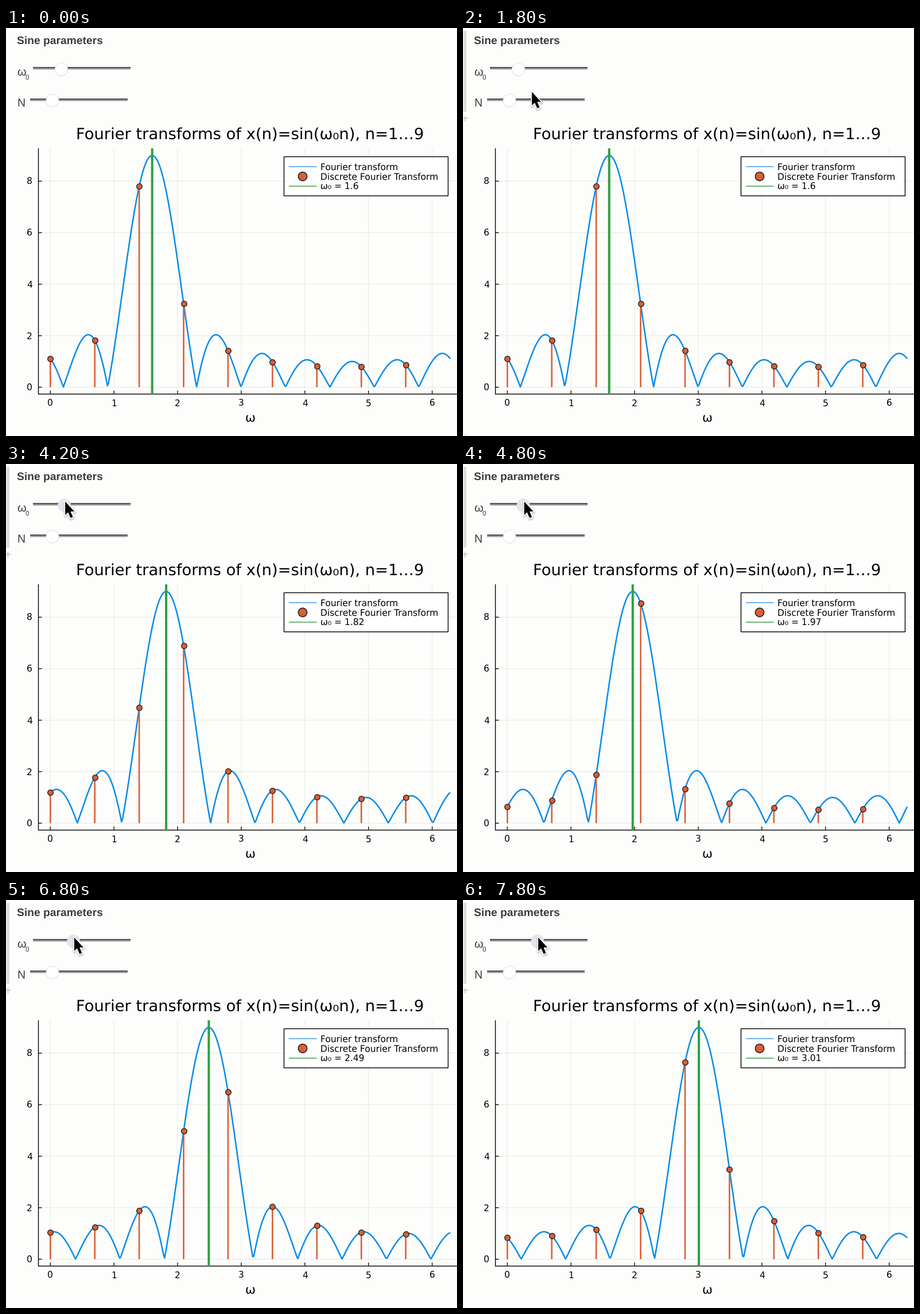
Animation, 786 px wide and 712 px high, one loop 8000 ms. Source, as a matplotlib script:

```python
import numpy as np
import matplotlib.pyplot as plt
from matplotlib.animation import FuncAnimation
from matplotlib.patches import Circle, Polygon, Rectangle

W, H, DPI = 786, 712, 64          # a power of two keeps the pixel size exact
PT = 72 / DPI                     # points per pixel
STEP, FRAMES = 200, 40
N = 9

BG, INK = "#fdfdfc", "#3b3b3b"
BLUE, ORANGE, GREEN = "#078be8", "#d95f35", "#2f9f43"

X0, XU = 77.3, 110.9              # plot origin and pixels per unit
Y0, YU = 626.8, 44.93
LEFT, TOP, BOTTOM = 56.5, 210, 638.8

plt.rcParams["text.hinting"] = "no_hinting"
fig = plt.figure(figsize=(W / DPI, H / DPI), dpi=DPI, facecolor=BG)
ax = fig.add_axes([0, 0, 1, 1])
ax.axis("off")


def px(w):
    return X0 + XU * np.asarray(w)


def py(v):
    return Y0 - YU * np.asarray(v)


def line(xs, ys, color="black", width=1.4, z=2, **kw):
    kw.setdefault("solid_capstyle", "butt")
    return ax.plot(xs, ys, color=color, lw=width * PT, zorder=z, snap=False, **kw)[0]


def shape(patch):
    patch.set_snap(False)
    return ax.add_patch(patch)


def label(x, y, s, size, ha="left", color="black", font="DejaVu Sans", **kw):
    return ax.text(x, y, s, fontsize=size * PT, ha=ha, va="baseline",
                   color=color, family=font, zorder=9, **kw)


def spectrum(w, w0):
    """Magnitude of the transform of N samples of a complex tone."""
    half = (np.asarray(w) - w0) / 2
    s = np.sin(half)
    flat = np.abs(s) < 1e-9
    return np.where(flat, N, np.abs(np.sin(N * half) / np.where(flat, 1, s)))


def slider(x, y, knob_x):
    """Draw a track; return the knob with its soft halos."""
    shades = np.array([[75], [95], [135], [165], [205]])
    ax.imshow(np.repeat(shades[:, :, None], 3, axis=2).astype(np.uint8),
              extent=(x, x + 170, y + 5, y), interpolation="nearest",
              aspect="auto", zorder=2)
    halos = [shape(Circle((knob_x, y + 3.8), r, fc="#555577", ec="none",
                          alpha=a, zorder=3)) for r, a in ((12.2, .05), (11.6, .08))]
    knob = shape(Circle((knob_x, y + 3.5), 11, fc="white", ec="#e6e4ec",
                        lw=.8 * PT, zorder=4))
    return knob, halos


# Controls
sans = dict(font="Liberation Sans", color=INK)
label(19, 28, "Sine parameters", 19.3, weight="bold", **sans)
label(19, 83, "ω", 20, **sans)
label(34, 90, "0", 11.5, **sans)
label(19, 137, "N", 19.5, **sans)
knob, knob_halos = slider(47, 68, 96.5)
slider(42, 123, 81)

# Cell edges shown while hovering
top_cell = [
    shape(Rectangle((1, 5), 5, 141, fc="#dededb", ec="none")),
    line([0, 9], [157.5, 157.5], "#b4b4b4", 1.2),
    line([3.5, 3.5], [153, 163], "#b4b4b4", 1.2),
]
plot_cell = shape(Rectangle((1, 167), 5, 537, fc="#dededb", ec="none"))
lower_plus = line([3.5, 3.5], [709, 712], "#c4c4c4", 1.2)

# Plot frame
for i in range(7):
    x = float(px(i))
    line([x, x], [TOP, BOTTOM], "#e8e9e0", 1, 1)
    line([x, x], [BOTTOM, BOTTOM - 6], width=1.3)
    label(x, 660, str(i), 15.5, "center")
for v in range(0, 9, 2):
    y = float(py(v))
    line([LEFT, W], [y, y], "#e6e6df", 1, 1)
    line([LEFT, LEFT + 6], [y, y], width=1.3)
    label(46, y + 5.7, str(v), 15.5, "right")
line([LEFT, LEFT], [TOP, BOTTOM + .7])
line([LEFT, W], [BOTTOM, BOTTOM])
label(425, 194, "Fourier transforms of x(n)=sin(ω₀n), n=1…9", 27.35, "center")
label(425.5, 687, "ω", 21.4, "center")

# Data
grid = np.linspace(0, 2 * np.pi, 400)
bins = 2 * np.pi * np.arange(N) / N
curve = line(px(grid), py(0 * grid), BLUE, 2.5, 3, solid_joinstyle="round")
stems = [line([x, x], [Y0, Y0], ORANGE, 2.6, 4) for x in px(bins)]
dots = line(px(bins), py(0 * bins), ORANGE, 0, 5, marker="o", ls="none",
            ms=9.6 * PT, mec="#1c1c1c", mew=1.3 * PT)
tone = line([0, 0], [TOP, BOTTOM], GREEN, 4, 6)

# Legend
shape(Rectangle((484.5, 224.6), 286, 68.3, fc="white", ec="black",
                lw=1.4 * PT, zorder=7))
line([493, 541.5], [242, 242], "#3f9fee", 1.5, 8)
line([493, 541.5], [276, 276], "#4aa855", 1.6, 8)
shape(Circle((517, 259), 7.6, fc=ORANGE, ec="#1c1c1c", lw=1.5 * PT, zorder=8))
label(548, 248, "Fourier transform", 15.55)
label(548, 265, "Discrete Fourier Transform", 15.55)
value = label(548, 282, "", 15.55)

# Pointer
ARROW = np.array([(0, 0), (0, 23.5), (5, 18.8), (9.4, 28.6), (13.4, 27),
                  (9.3, 17.3), (16, 17.3)])
shadows = [shape(Polygon(ARROW, fc="black", ec="black", lw=w * PT, alpha=.05,
                         joinstyle="round", zorder=10)) for w in (4, 6, 8)]
pointer_edge = shape(Polygon(ARROW, fc="white", ec="white", lw=3.2 * PT,
                             joinstyle="round", zorder=11))
pointer = shape(Polygon(ARROW, fc="black", ec="none", zorder=12))

ax.set_xlim(0, W)
ax.set_ylim(H, 0)
ax.set_aspect("auto")


def drag_steps(t):
    """Whole pointer steps the knob has been dragged by time t."""
    return int(round(np.interp(t, [3500, 4800, 5800, 6800, 7800],
                               [0, 5, 8, 12, 19])))


def pointer_at(t, k):
    if k:
        return 97.9 + 1.75 * k, 65.5
    times = [1000, 1400, 1800, 2400]
    return (np.interp(t, times, [300, 190, 120, 95]),
            np.interp(t, times, [690, 390, 111.5, 65]))


def draw(i):
    t = i * STEP
    k = drag_steps(t)
    w0 = round(1.6 + .0742 * k, 2)

    curve.set_ydata(py(spectrum(grid, w0)))
    tops = py(spectrum(bins, w0))
    dots.set_ydata(tops)
    for stem, y in zip(stems, tops):
        stem.set_ydata([Y0, y])
    tone.set_xdata([px(w0)] * 2)
    value.set_text(f"ω₀ = {w0:g}")

    kx = 58.5 + 23.75 * w0
    knob.center = kx, 72
    for h in knob_halos:
        h.center = kx, 72.3
    knob.set_facecolor("#e7e5ec" if t >= 2400 else "white")

    for part in top_cell:
        part.set_visible(t >= 1600)
    plot_cell.set_visible(1000 <= t < 1600)
    lower_plus.set_visible(1000 <= t <= 1800)

    x, y = pointer_at(t, k)
    for p in (pointer, pointer_edge, *shadows):
        p.set_visible(t >= 1000)
    pointer.set_xy(ARROW + (x, y))
    pointer_edge.set_xy(ARROW + (x, y))
    for s in shadows:
        s.set_xy(ARROW + (x + .5, y + 2))
    return []


anim = FuncAnimation(fig, draw, frames=FRAMES, init_func=lambda: draw(0),
                     interval=STEP, repeat=True, repeat_delay=0)
plt.show()
```
